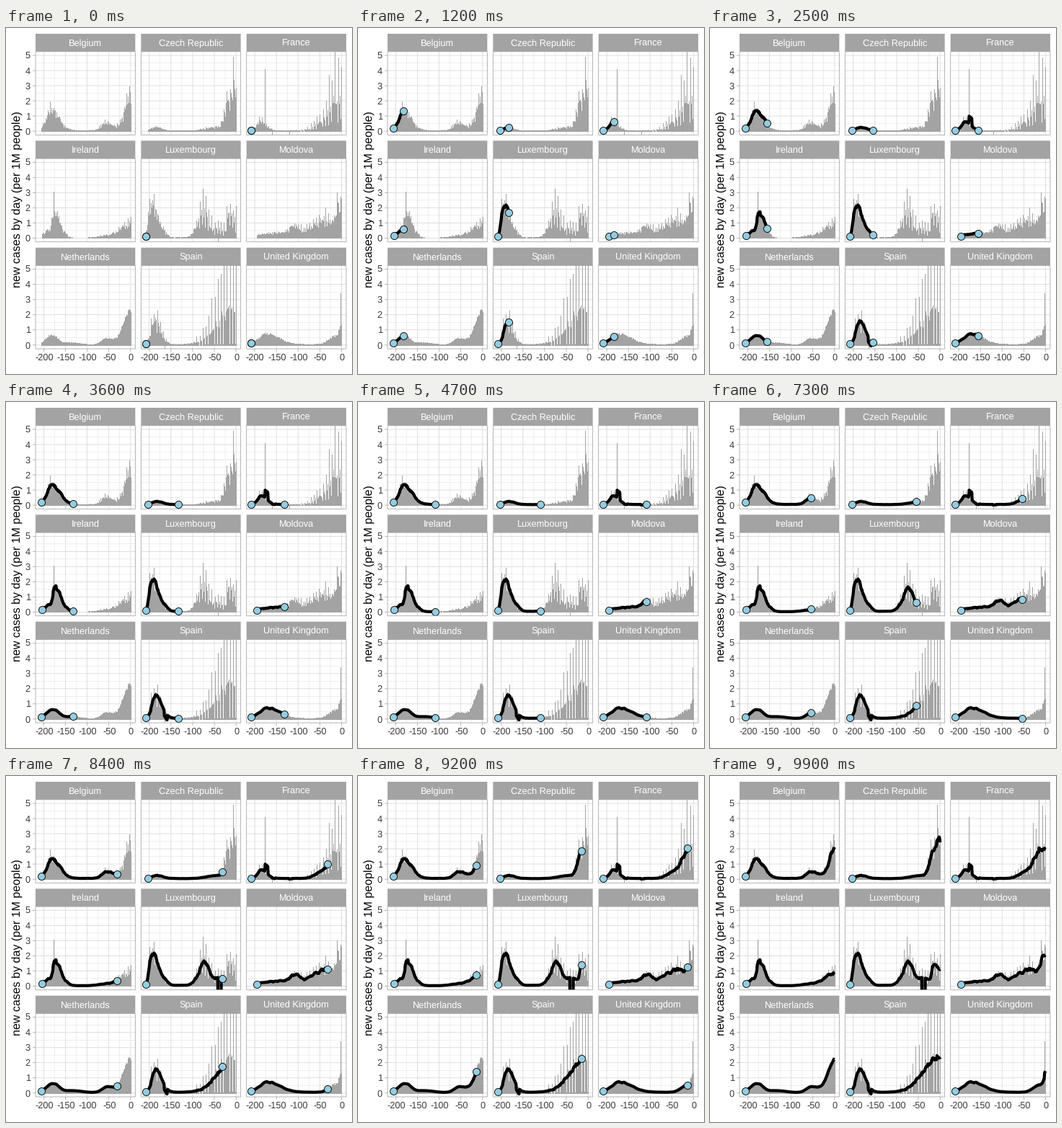
A matplotlib script that plays this animation: 480x480 px, repeating every 10 s.

```python
import numpy as np
import matplotlib
import matplotlib.pyplot as plt
from matplotlib.animation import FuncAnimation
from matplotlib.collections import LineCollection
from matplotlib.patches import Rectangle

matplotlib.rcParams.update({"font.family": "Liberation Sans", "text.hinting": "none"})

SIZE, FRAMES, INTERVAL = 480, 100, 100
FIRST_DAY = -208
GREY, GRID, INK, BLUE = "#a3a3a3", "#d7d7d7", "#3b3b3b", "#94cce0"

# Layout in pixels, y pointing down
LEFT, TOP, STRIP, GAP = 41, 8, 24.75, 8
PANEL_W, PANEL_H = (472 - LEFT - 2 * GAP) / 3, 115.6
DAY_W, UNIT_H = PANEL_W / 229.8, PANEL_H / 5.5

fig = plt.figure(figsize=(SIZE / 72, SIZE / 72), dpi=72, facecolor="white")
ax = fig.add_axes([0, 0, 1, 1])
ax.set_xlim(0, SIZE)
ax.set_ylim(SIZE, 0)
ax.axis("off")


def segments(lines, color, width, z, crisp=False):
    group = LineCollection(lines, colors=color, linewidths=width, zorder=z,
                           antialiaseds=not crisp)
    group.set_snap(crisp)
    ax.add_collection(group, autolim=False)
    return group


def box(x, y, w, h, z, **style):
    return ax.add_patch(Rectangle((x, y), w, h, zorder=z, snap=False, **style))


def label(x, y, text, color=INK, ha="center"):
    ax.text(x, y, text, color=color, ha=ha, va="baseline", fontsize=12.8, zorder=6)


def outbreak(days, base, waves):
    """Sum of lopsided bells, each (peak day, height, half-rise, half-fall)."""
    total = np.full(days.size, base)
    for peak, height, rise, fall in waves:
        z = (days - peak) / np.where(days < peak, rise, fall)
        total += height * 0.5 ** (z * z)
    return total


def reporting(days, held, monday):
    """Weekends hold back a share of the cases and Monday catches up."""
    weekday = (days - monday) % 7
    effect = np.where(weekday == 0, 2 * held, np.where(weekday > 4, -held, 0))
    return 1 + effect * np.where(days > -95, 1, .3)


class Panel:
    def __init__(self, index, name, start, waves, base=.05, noise=.15,
                 held=.1, monday=0, odd_days=None):
        row, col = divmod(index, 3)
        self.left = LEFT + col * (PANEL_W + GAP)
        self.top = TOP + STRIP + row * (STRIP + PANEL_H + GAP)

        days = np.arange(start - 6, 1)
        jitter = np.random.default_rng(index + 3).normal(size=days.size).clip(-2, 2)
        # The trailing mean lags the daily counts by three days
        counts = outbreak(days + 3, base, waves) * (1 + noise * jitter)
        counts *= reporting(days, held, monday)
        for day, count in (odd_days or {}).items():
            counts[days == day] = count
        self.days = days[6:]
        self.means = np.convolve(counts, np.ones(7) / 7, "valid")

        self.draw_frame(name, row, col)
        bars = segments([[(self.x(d), self.y(0)), (self.x(d), self.y(c))]
                         for d, c in zip(self.days, counts[6:])], GREY, 1, 2, crisp=True)
        self.line, = ax.plot([], [], color="black", lw=4.2, zorder=3,
                             solid_capstyle="butt", solid_joinstyle="round")
        self.dots, = ax.plot([], [], "o", ms=10, mfc=BLUE, mec="black",
                             mew=.9, zorder=4)
        for artist in (bars, self.line, self.dots):
            artist.set_clip_path(self.clip)

    def x(self, day):
        return self.left + (day + 218.9) * DAY_W

    def y(self, rate):
        return self.top + (5.25 - rate) * UNIT_H

    def draw_frame(self, name, row, col):
        l, t = self.left, self.top
        r, b = l + PANEL_W, t + PANEL_H
        for days, rates, width in ((range(-175, 0, 50), np.arange(.5, 5), .39),
                                   (range(-200, 1, 50), range(6), .78)):
            segments([[(self.x(d), t), (self.x(d), b)] for d in days]
                     + [[(l, self.y(v)), (r, self.y(v))] for v in rates],
                     GRID, width, 1)
        self.clip = box(l, t, PANEL_W, PANEL_H, 5, fc="none", ec=GREY, lw=.8)
        box(l, t - STRIP, PANEL_W, STRIP, 5, fc=GREY, lw=0)
        label(l + PANEL_W / 2, t - STRIP / 2 + 4.6, name, "white")
        if col == 0:
            for v in range(6):
                segments([[(l - 4, self.y(v)), (l, self.y(v))]], GREY, .78, 1)
                label(l - 7.2, self.y(v) + 4.6, str(v), ha="right")
        if row == 2:
            for d in range(-200, 1, 50):
                segments([[(self.x(d), b), (self.x(d), b + 4)]], GREY, .78, 1)
                label(self.x(d) + .6, b + 16.2, str(d))

    def reveal(self, now, last):
        if now < self.days[0]:
            self.line.set_data([], [])
            self.dots.set_data([], [])
            return
        past = self.days < now
        days = np.append(self.days[past], now)
        means = np.append(self.means[past], np.interp(now, self.days, self.means))
        self.line.set_data(self.x(days), self.y(means))
        ends = [0] if last else [0, -1]
        self.dots.set_data(self.x(days[ends]), self.y(means[ends]))


panels = [
    Panel(0, "Belgium", -205,
          [(-180, 1.25, 14, 21), (-55, .47, 12, 20), (2, 2.1, 15, 15)],
          noise=.18, held=.2, monday=4),
    Panel(1, "Czech Republic", -203,
          [(-183, .22, 11, 16), (-45, .2, 25, 20), (-14, 1.95, 10, 25), (0, 1.3, 5, 5)],
          base=.04, held=.25),
    Panel(2, "France", -208,
          [(-184, .62, 10, 14), (-45, .4, 18, 10), (-10, 1.9, 19, 30)],
          held=.65, monday=6, odd_days={-176: 4.1, -160: -.25, -121: -.2}),
    Panel(3, "Ireland", -204,
          [(-190, .35, 12, 8), (-172, 1.5, 8, 13), (-150, .15, 10, 10),
           (-45, .15, 25, 15), (0, .85, 22, 10)],
          base=.03, noise=.2, held=.15, odd_days={-178: 3.05}),
    Panel(4, "Luxembourg", FIRST_DAY,
          [(-193, 2.6, 6.5, 14), (-165, .3, 12, 9), (-72, 1.6, 16, 13),
           (-40, .55, 9, 16), (-14, 1.3, 5, 8), (0, 1, 6, 6)],
          noise=.18, held=.55, odd_days={-41: -25}),
    Panel(5, "Moldova", -195,
          [(-150, .3, 40, 60), (-104, .55, 13, 9), (-40, 1, 32, 35), (3, 1.6, 14, 10)],
          base=.03, noise=.18, held=.2, monday=4),
    Panel(6, "Netherlands", -206,
          [(-178, .62, 17, 16), (-135, .13, 15, 25), (-54, .38, 13, 22), (2, 2.2, 19, 10)],
          base=.03, noise=.07, held=.03),
    Panel(7, "Spain", FIRST_DAY,
          [(-187, 1.6, 8, 17), (-6, 2.3, 40, 30)],
          noise=.12, held=.97, odd_days={-165: -2}),
    Panel(8, "United Kingdom", FIRST_DAY,
          [(-172, .68, 20, 27), (-140, .12, 15, 28), (-14, .5, 16, 40), (2, .8, 5, 5)],
          noise=.1, held=.08, odd_days={-2: 3.4}),
]

ax.text(20.1, 237.3, "new cases by day (per 1M people)", fontsize=16, rotation=90,
        rotation_mode="anchor", ha="center", va="baseline", color="black")


def update(frame):
    now = FIRST_DAY * (1 - frame / (FRAMES - 1))
    for panel in panels:
        panel.reveal(now, frame == FRAMES - 1)
    return [a for p in panels for a in (p.line, p.dots)]


anim = FuncAnimation(fig, update, frames=FRAMES, interval=INTERVAL,
                     repeat=True, repeat_delay=0, blit=False)
plt.show()
```
